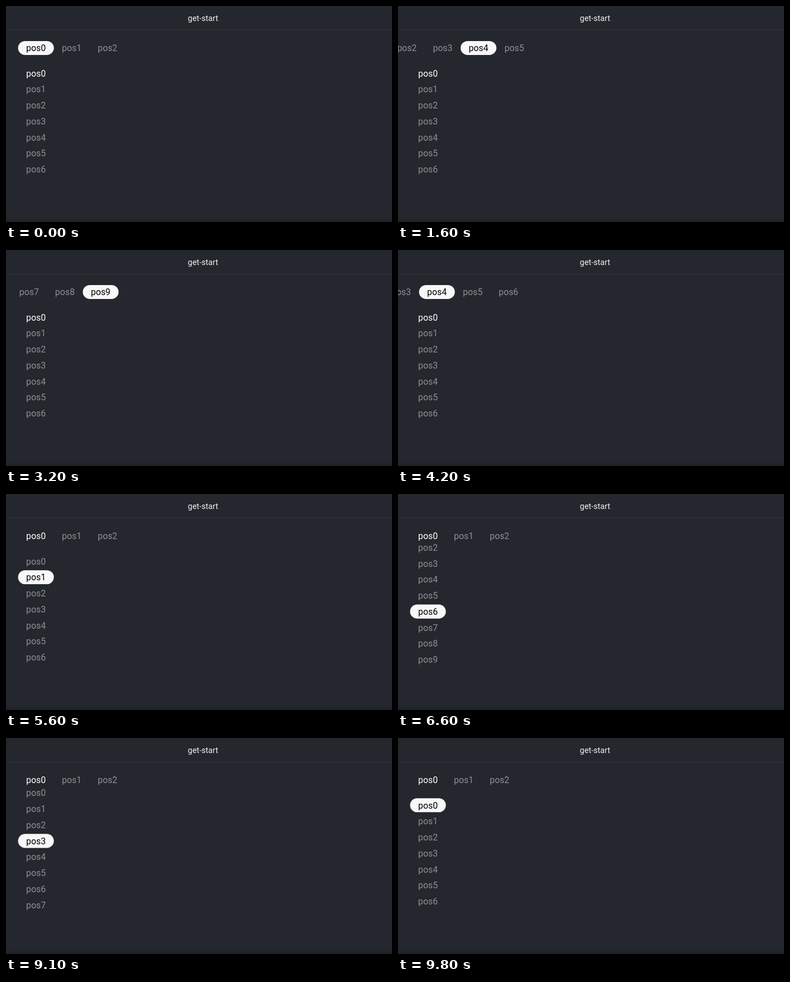
Animation, 690 px wide and 388 px high, one loop 9.9 s. Source, as an HTML page with a canvas:

```html
<!DOCTYPE html>
<html lang="en">
<head>
<meta charset="utf-8">
<title>get-start</title>
<style>
  html, body { margin: 0; height: 100%; overflow: hidden; background: #24272d; }
  canvas { display: block; }
</style>
</head>
<body>
<canvas id="stage" width="690" height="388"></canvas>
<script>
const ctx = document.getElementById('stage').getContext('2d');
const SCALE = 690 / 1920;            // the layout uses a 1920 px wide screen
const LOOP = 9900, TICK = 100;
const COUNT = 10, VIEW = 620, PADDING = 60;
const ITEM_W = 178, ITEM_H = 70;
const SCROLL_MS = 150;
const SWITCH_TIME = 5180;            // focus moves from the row to the column

// Evenly spaced key presses that move the focus from one index to another.
function presses(first, last, start, interval) {
  const step = Math.sign(last - first) || 1;
  return Array.from({ length: Math.abs(last - first) + 1 },
    (_, k) => ({ time: start + k * interval, index: first + k * step }));
}

const row = {
  size: ITEM_W, pitch: ITEM_W, maxScroll: 1280,
  place: offset => [offset, 175],
  presses: [
    ...presses(1, 9, 580, 300),
    ...presses(8, 8, 3380, 0),
    ...presses(7, 0, 3785, 115),
  ],
};

const column = {
  size: ITEM_H, pitch: 80, maxScroll: 300,
  place: offset => [PADDING, 241 + offset],
  presses: [
    ...presses(1, 9, 5590, 180),
    ...presses(8, 6, 7880, 200),
    ...presses(5, 3, 8650, 170),
    ...presses(2, 0, 9250, 200),
  ],
};

const clamp = (value, low, high) => Math.min(high, Math.max(low, value));
const easeOut = p => 1 - (1 - clamp(p, 0, 1)) ** 3;

// Forward moves bring the item's start to the middle, backward moves its end.
function listState(list, t) {
  let index = 0, from = 0, to = 0, since = 0;
  const scrollAt = time => from + (to - from) * easeOut((time - since) / SCROLL_MS);
  for (const press of list.presses) {
    if (press.time > t) break;
    from = scrollAt(press.time);
    const start = PADDING + press.index * list.pitch;
    const edge = press.index > index ? start : start + list.size;
    to = clamp(edge - VIEW / 2, 0, list.maxScroll);
    since = press.time;
    index = press.index;
  }
  return { index, scroll: scrollAt(t) };
}

function drawItem(label, x, y, selected, focused) {
  if (selected && focused) {
    ctx.fillStyle = '#f8f8f8';
    ctx.beginPath();
    ctx.roundRect(x, y, ITEM_W, ITEM_H, ITEM_H / 2);
    ctx.fill();
    ctx.fillStyle = '#000';
  } else {
    ctx.fillStyle = selected ? '#fff' : '#8e9094';
  }
  ctx.fillText(label, x + ITEM_W / 2, y + 51);
}

function drawList(list, t, focused) {
  const { index, scroll } = listState(list, t);
  for (let i = 0; i < COUNT; i++) {
    const offset = PADDING + i * list.pitch - scroll;
    const middle = offset + list.size / 2;
    if (middle < 0 || middle > VIEW) continue;
    drawItem('pos' + i, ...list.place(offset), i === index, focused);
  }
}

function draw(t) {
  ctx.setTransform(1, 0, 0, 1, 0, 0);
  ctx.fillStyle = '#24272d';
  ctx.fillRect(0, 0, 690, 388);
  ctx.fillStyle = '#2e3136';
  ctx.fillRect(0, 43, 690, 1);
  ctx.fillStyle = '#202328';
  ctx.fillRect(0, 383, 690, 5);

  ctx.scale(SCALE, SCALE);
  ctx.textAlign = 'center';
  ctx.fillStyle = '#f2f2f2';
  ctx.font = '40px Roboto, sans-serif';
  ctx.fillText('get-start', 980, 76);

  ctx.font = '44px Roboto, sans-serif';
  const inColumn = t >= SWITCH_TIME;
  drawList(row, t, !inColumn);
  drawList(column, t, inColumn);
}

const startTime = performance.now();
function frame() {
  const t = (performance.now() - startTime) % LOOP;
  draw(Math.floor(t / TICK) * TICK);
  requestAnimationFrame(frame);
}
frame();
</script>
</body>
</html>
```
